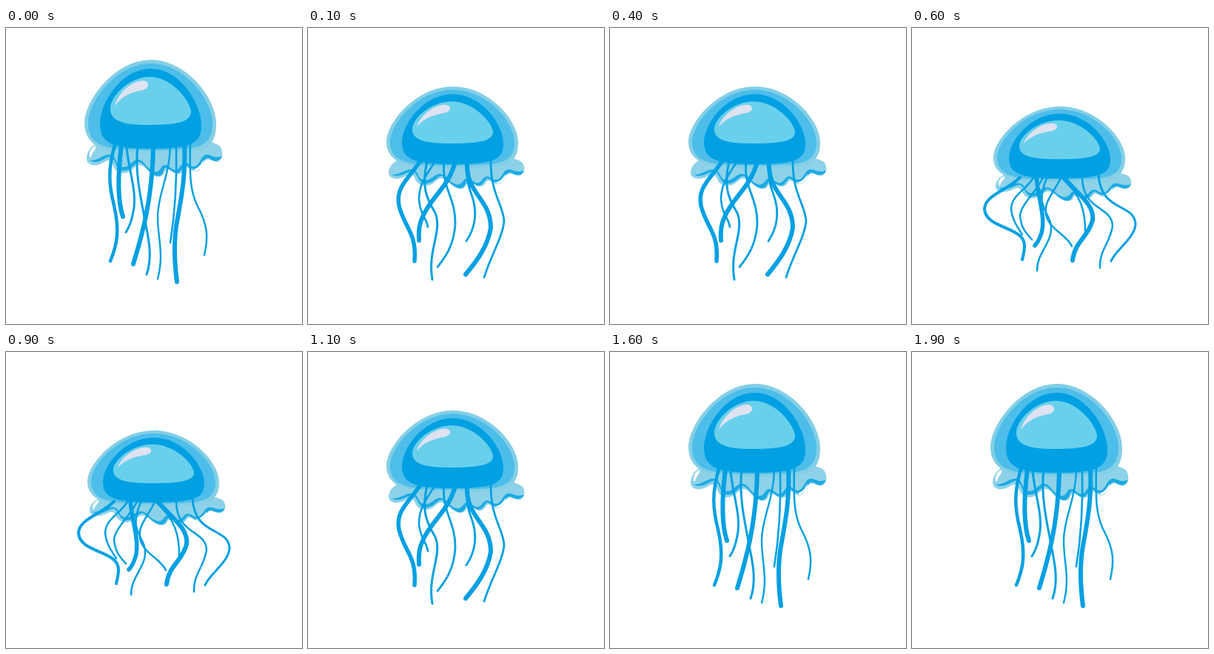
Write an HTML page that moves like this. It is 400x400 px and loops after 2100 ms.

```html
<!DOCTYPE html>
<html lang="en">
<head>
<meta charset="utf-8">
<title>Jellyfish</title>
<style>
  html, body { margin: 0; width: 100%; height: 100%; overflow: hidden; background: #fff; }
  svg { display: block; width: 100%; height: 100%; }
  .tentacles { fill: none; stroke: #00a0e3; stroke-linecap: round; stroke-linejoin: round; }
</style>
</head>
<body>
<svg viewBox="0 0 400 400">
  <g id="bell">
    <g id="frill">
      <path fill="#8dd2e9" d="M119 158C111 163 107 174 110 181C115 188 126 186 133 181C139 177 143 179 145 186C148 196 158 198 165 195C172 192 175 184 181 185C188 186 191 194 198 198C204 203 212 202 214 195C217 189 221 191 226 195C232 200 238 197 241 190C245 185 248 192 253 193C261 196 265 187 268 180C273 174 279 181 286 181C293 178 294 168 290 161C286 156 280 156 276 153L123 153Z"/>
      <path fill="#1baae3" d="M113 179C124 180 132 170 141 171C151 173 147 187 158 188C168 188 171 177 179 178C188 179 189 190 200 194C207 196 208 190 212 186C218 183 222 190 228 192C234 193 236 183 241 182C247 181 248 188 255 187C263 185 263 172 271 171C278 171 280 177 292 173C289 181 281 181 276 177C269 172 266 185 260 189C251 194 247 187 243 185C239 185 237 197 230 196C223 195 219 187 215 189C212 193 212 201 204 200C193 197 188 184 180 181C175 181 170 193 159 193C148 192 149 178 142 174C135 173 125 186 113 179Z"/>
      <path id="leftGleam" fill="#fff" d="M113 174C112 167 116 161 121 159C123 164 116 167 115 175Z"/>
      <path fill="#fff" d="M254 191C261 189 264 183 267 178C267 186 262 192 256 193Z"/>
    </g>
    <path fill="#83cfe6" d="M106 128C106 99 146 43 196 43C243 43 284 94 284 130C284 154 274 163 255 166C225 170 170 170 140 165C119 161 106 150 106 128Z"/>
    <path fill="#4dbdea" d="M111 128C111 101 148 48 196 48C240 48 279 96 279 130C279 150 269 159 252 162C225 166 170 166 142 162C121 158 111 148 111 128Z"/>
    <path fill="#00a0e3" d="M127 129C127 102 155 55 196 55C234 55 264 101 264 132C264 156 250 163 196 163C144 163 127 156 127 129Z"/>
    <path fill="#69d0ec" d="M141 108C142 91 167 66 194 66C221 66 246 93 250 112C251 127 232 131 192 131C155 131 140 124 141 108Z"/>
    <path fill="#dfe2f0" d="M147 105C150 91 168 71 186 71C195 73 194 82 184 84C168 87 157 92 147 105Z"/>
  </g>
  <g id="stretched" class="tentacles">
    <path stroke-width="4.5" d="M148 155C137 190 139 212 146 240C154 275 150 293 141 315"/>
    <path stroke-width="6" d="M156 158C152 190 149 228 158 255"/>
    <path stroke-width="3" d="M163 160C165 190 178 222 172 248C170 260 166 270 162 276"/>
    <path stroke-width="3" d="M178 160C174 190 181 225 186 250C190 275 200 305 190 333"/>
    <path stroke-width="6" d="M199 160C198 215 191 250 183 280C178 300 174 312 172 319"/>
    <path stroke-width="2.4" d="M222 160C221 200 205 225 205 255C205 285 214 305 205 339"/>
    <path stroke-width="2.6" d="M230 160C231 200 230 240 222 290"/>
    <path stroke-width="6" d="M241 156C243 195 238 225 231 262C226 290 228 320 231 343"/>
    <path stroke-width="2.5" d="M249 156C248 200 249 220 258 239C274 268 273 285 268 307"/>
  </g>
  <g id="curling" class="tentacles">
    <path stroke-width="5.5" d="M153 178C135 205 118 215 123 240C130 270 147 275 144 315"/>
    <path stroke-width="2.6" d="M172 180C155 205 150 215 150 232C152 255 160 255 162 269"/>
    <path stroke-width="3" d="M161 180C153 215 160 230 172 250C182 275 161 300 168 340"/>
    <path stroke-width="6" d="M199 181C190 215 165 230 155 255C150 265 149 275 150 287"/>
    <path stroke-width="2.8" d="M184 181C180 215 200 230 199 265C197 295 185 310 175 323"/>
    <path stroke-width="2.8" d="M215 181C214 200 215 210 221 225C230 250 226 270 214 288"/>
    <path stroke-width="6" d="M215 181C213 225 247 230 247 270C243 295 228 315 213 333"/>
    <path stroke-width="2.8" d="M247 177C246 225 265 240 265 262C262 285 248 305 238 337"/>
  </g>
  <g id="squeezed" class="tentacles">
    <path stroke-width="4" d="M146 202C128 220 98 226 98 245C100 272 152 268 152 294C152 302 150 308 149 313"/>
    <path stroke-width="2.5" d="M165 201C152 222 134 225 134 246C136 260 142 268 149 279"/>
    <path stroke-width="2.5" d="M178 201C165 225 148 238 146 253C147 268 152 275 162 286"/>
    <path stroke-width="5.5" d="M168 200C170 230 181 255 175 277C172 286 170 290 166 294"/>
    <path stroke-width="2.5" d="M183 201C170 230 176 240 184 255C199 285 168 300 169 328"/>
    <path stroke-width="2.5" d="M202 201C190 225 178 235 181 252C185 272 210 280 216 295"/>
    <path stroke-width="6" d="M204 201C224 225 247 238 244 260C238 283 220 288 217 314"/>
    <path stroke-width="2.5" d="M203 201C228 228 235 245 234 280"/>
    <path stroke-width="2.5" d="M230 201C230 248 271 240 271 268C267 292 253 300 254 324"/>
    <path stroke-width="3" d="M252 198C255 250 302 236 302 266C300 285 275 300 269 315"/>
  </g>
</svg>
<script>
  const LOOP = 2100, BELL_TOP = 43;
  const byId = id => document.getElementById(id);
  const poses = {
    stretched: { x: 0, top: 43, scale: 1, gleam: true },
    curling: { x: 0, top: 79, scale: 0.875, gleam: false },
    squeezed: { x: 4, top: 106, scale: 0.81, gleam: true }
  };

  // The swimmer snaps between poses: each one holds until the given time.
  const schedule = [
    [100, "stretched"], [600, "curling"], [1100, "squeezed"],
    [1600, "curling"], [LOOP, "stretched"]
  ];

  function show(name) {
    const { x, top, scale, gleam } = poses[name];
    byId("bell").setAttribute("transform",
      `translate(${x} ${top}) scale(1 ${scale}) translate(0 ${-BELL_TOP})`);
    byId("leftGleam").style.display = gleam ? "" : "none";
    for (const id in poses) byId(id).style.display = id === name ? "" : "none";
  }

  function draw() {
    const time = performance.now() % LOOP;
    show(schedule.find(([end]) => time < end)[1]);
    requestAnimationFrame(draw);
  }
  draw();
</script>
</body>
</html>
```
